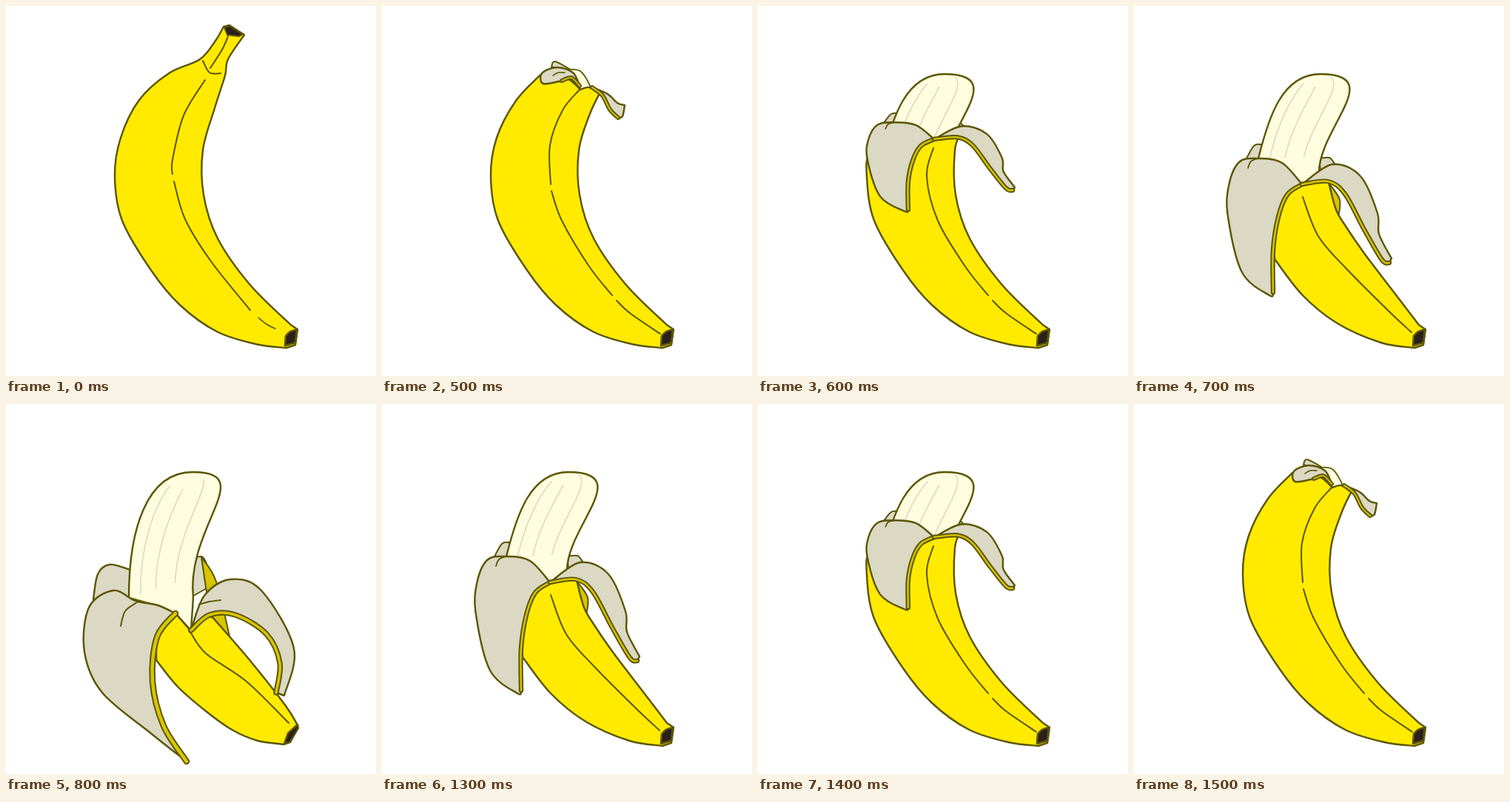
An HTML page that plays this animation: 500 px wide and 500 px high, repeating every 1600 ms.

```html
<!DOCTYPE html>
<html lang="en">
<head>
<meta charset="utf-8">
<title>Banana</title>
<style>
  html, body { margin: 0; width: 100%; height: 100%; overflow: hidden; background: #fff; }
  svg { display: block; width: 100%; height: 100%; }
</style>
</head>
<body>
<svg id="stage" viewBox="0 0 500 500" stroke-linecap="round" stroke-linejoin="round"></svg>
<script>
const NS = 'http://www.w3.org/2000/svg';
const INK = '#5b5500', SKIN = '#ffea00', RIM = '#d8c600', PEEL = '#dbd8c3',
      FLESH = '#fffddf', VEIN = '#dedbc4', TIP = '#2a1f1c';

const stage = document.getElementById('stage');

function add(parent, name, attrs) {
  const el = document.createElementNS(NS, name);
  for (const key in attrs) el.setAttribute(key, attrs[key]);
  return parent.appendChild(el);
}

// Smooth curve through "x,y" key points; "|" marks a corner.
function smooth(text) {
  let last = null, d = '';
  for (const part of text.split('|')) {
    const p = part.trim().split(/\s+/).map(s => s.split(',').map(Number));
    if (last) p.unshift(last);
    else d = `M${p[0]}`;
    for (let i = 0; i < p.length - 1; i++) {
      const a = p[i - 1] || p[i], b = p[i], c = p[i + 1], e = p[i + 2] || c;
      const out = b.map((v, k) => v + (c[k] - a[k]) / 6);
      const into = c.map((v, k) => v - (e[k] - b[k]) / 6);
      d += `C${out} ${into} ${c}`;
    }
    last = p[p.length - 1];
  }
  return d;
}

const shape = (fill, points, width = 2.4) =>
  ({ d: smooth(points) + 'Z', fill, stroke: INK, 'stroke-width': width });
const line = (points, width = 2, stroke = INK) =>
  ({ d: smooth(points), fill: 'none', stroke, 'stroke-width': width });

// A hanging piece of peel whose inner edge carries a darker rim.
const flap = (outer, inner, rim) => {
  const tip = outer.split(' ').pop();
  const edge = `${tip} ${inner}`;
  return [shape(PEEL, `${outer} | ${inner}`), line(edge, rim + 4), line(edge, rim, RIM)];
};

// Both sides are cubics meeting at the apex; veins lie between them.
function flesh(left, right, notch) {
  const apex = [252, 92];
  const sides = [[...left, apex], [...right, apex]];
  const cubic = ([a, b, c, e]) => `M${a}C${b} ${c} ${e}`;
  const mix = u => sides[0].map((p, i) => p.map((v, k) => v + (sides[1][i][k] - v) * u));
  const [base, low, high] = right;
  const outline = { d: `${cubic(sides[0])}C${high} ${low} ${base}L${notch}Z`,
    fill: FLESH, stroke: INK, 'stroke-width': 2.4 };
  const veins = [0.18, 0.42, 0.72].map((u, i) => ({
    d: cubic(mix(u)), fill: 'none', stroke: VEIN, 'stroke-width': 1.7,
    pathLength: 100, 'stroke-dasharray': '78 100', 'stroke-dashoffset': -3 - 4 * i
  }));
  return [outline, ...veins];
}

const LEFT = '147,230 157,290 196,357 235,404 285,440 338,457 379,462';
const RIGHT = '330,377 286,314 267,255 266,195';
const END = '| 391,458 | 394,437 | 385,431 |';
const body = (start, finish, left = LEFT, right = RIGHT) =>
  shape(SKIN, `${start} ${left} ${END} ${right} ${finish}`);
const stub = shape(TIP, '377,459 | 378,446 | 384,440 393,437 | 391,455 | 377,459', 2.6);

const closed = [
  body('322,39 | 302,26 | 294,28 | 283,47 262,72 220,91 180,127 155,178', '282,138 296,94 300,72 322,39'),
  shape(TIP, '295,29 | 302,27 | 320,38 | 315,41 | 299,39 | 295,29', 2),
  line('300,41 292,59 276,84'),
  line('266,74 275,90 290,91'),
  line('269,100 240,148 225,208 225,227'),
  line('227,237 242,288 277,345 330,411'),
  line('341,421 352,430 364,436', 1.6),
  stub
];

const opening = [
  shape(PEEL, '229,82 234,75 256,88 229,82', 2),
  shape(FLESH, '246,86 268,88 282,112 268,112 246,86', 1.8),
  body('268,113 | 250,98 214,93 | 181,128 155,178', '280,148 294,118 | 280,110 268,113'),
  ...flap('267,108 258,90 236,83 216,91 218,105 243,101', '256,97 267,108', 1.8),
  line('231,94 238,90 247,90', 1.6),
  ...flap('284,110 305,119 318,131 328,134 | 325,149 319,151', '308,140 298,121 284,110', 2),
  line('267,113 244,141 227,188 228,241'),
  line('229,250 243,290 280,352 311,391'),
  line('317,398 335,415 376,443'),
  stub
];

const core = flesh([[168, 206], [182, 150], [200, 92]], [[250, 225], [250, 165], [342, 92]], [227, 243]);
const backPeel = [
  shape(PEEL, '151,208 162,189 172,187 | 180,210', 2),
  shape(PEEL, '250,206 264,205 271,213 | 252,222', 2)
];
const frontPeel = [
  ...flap('227,241 200,212 168,206 142,211 128,243 127,285 146,360 183,391 188,387',
    '188,330 195,285 207,255 227,241', 2.4),
  line('154,219 158,210 167,206', 1.8),
  ...flap('227,241 268,214 306,230 329,280 331,308 348,341 | 345,347',
    '335,343 311,302 285,254 262,237 227,241', 2.4)
];

const wide = [
  ...backPeel,
  shape(RIM, '262,238 278,262 275,290 | 264,264', 2),
  ...core,
  body('227,241 | 214,238 191,300 190,342 |', '273,275 263,238 | 244,235 227,241',
    '228,391 275,429 334,455 379,462', '346,380 311,334 287,299'),
  ...frontPeel,
  line('228,258 249,311 287,355 346,414 375,441'),
  stub
];

// Halfway down, the same peel hangs higher and shorter.
const raise = parts => parts.map(part => ({
  ...part,
  transform: 'translate(238 180) scale(.9 .65) translate(-227 -241)',
  'vector-effect': 'non-scaling-stroke'
}));

const half = [
  ...raise(backPeel),
  ...core,
  body('238,180 | 190,190 152,200', '274,172 | 238,180'),
  ...raise(frontPeel),
  line('237,192 228,230 243,290 280,352 311,391'),
  line('317,398 335,415 376,443'),
  stub
];

const peeled = [
  shape(PEEL, '118,264 124,230 140,217 168,224 | 170,265'),
  shape(PEEL, '251,209 264,206 270,213 | 278,245 | 252,260', 2),
  shape(RIM, '264,207 284,240 303,318 | 278,300 | 264,207', 2),
  ...flesh([[166, 262], [166, 170], [190, 92]], [[253, 262], [243, 165], [342, 92]], '250,306 229,283 195,270'),
  shape(SKIN, `229,283 250,307 | 264,289 279,288 | 330,347 378,408 394,434 | 384,457 | 376,460 |
    340,455 305,440 270,415 232,382 203,346 | 206,308 229,283`),
  ...flap('229,283 205,272 175,266 145,252 112,275 106,335 130,390 197,446 244,483',
    '213,435 198,375 204,315 229,283', 4.5),
  line('155,300 161,280 177,268'),
  ...flap('250,306 268,259 303,237 345,252 389,330 376,394 | 365,390',
    '370,350 352,311 310,285 275,285 250,306', 3.5),
  line('261,271 275,267 290,265', 1.8),
  line('249,308 270,337 325,375 382,431'),
  shape(TIP, '376,459 | 381,445 | 394,433 | 395,438 | 384,457 | 376,459')
];

const poses = [closed, opening, half, wide, peeled].map(parts => {
  const group = add(stage, 'g', { display: 'none' });
  parts.forEach(attrs => add(group, 'path', attrs));
  return group;
});

// Peels open in 100 ms steps, holds, then closes through the same poses.
const STEP = 100, HOLD = 500, LAST = poses.length - 1;
const LOOP = 2 * (HOLD + (LAST - 1) * STEP);

function render(time) {
  const t = time % LOOP;
  const progress = t < LOOP / 2 ? t - HOLD : LOOP - 1e-6 - t;
  const active = Math.max(0, Math.min(LAST, Math.floor(progress / STEP) + 1));
  poses.forEach((pose, i) => pose.setAttribute('display', i === active ? 'inline' : 'none'));
}

const begin = performance.now();
function tick() {
  render(performance.now() - begin);
  requestAnimationFrame(tick);
}
tick();
</script>
</body>
</html>
```
